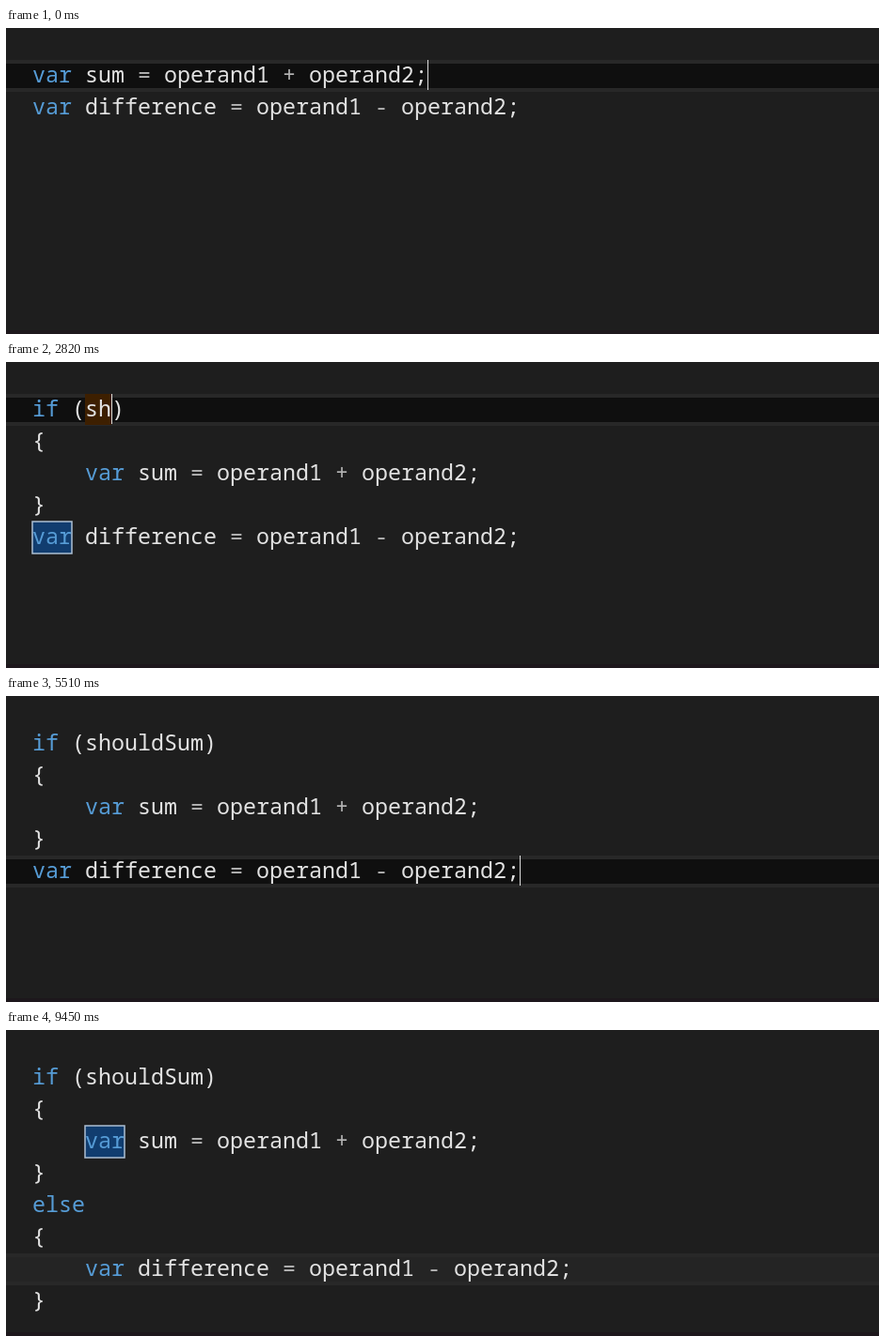
These frames come from a looping animation (928x326 px, 9.48 s). An HTML page with a canvas:

```html
<!DOCTYPE html>
<html lang="en">
<head>
<meta charset="utf-8">
<title>Surround With</title>
<style>
html, body { margin: 0; width: 100%; height: 100%; overflow: hidden; background: #1e1e1e; }
canvas { display: block; }
</style>
</head>
<body>
<canvas id="stage" width="928" height="326"></canvas>
<script>
const ctx = document.getElementById('stage').getContext('2d');
const LOOP = 9480, BLINK = 530, CW = 14, LH = 34, ROW = 27;
const CODE = '500 23.333px "Noto Sans Mono", monospace';
const UI = '500 22.8px "Open Sans", sans-serif';
const SUM = 'var sum = operand1 + operand2;';
const DIFF = 'var difference = operand1 - operand2;';
const SNIPPETS = '#if #region checked class do else enum for foreach forr if interface iterator lock namespace'.split(' ');
const NAMES = 'short shouldSum ushort HashCode HashSet Int16 Stack String Share'.split(' ');

// Key moments of the edit
const IF_ADDED = 2410, TYPE = 2740, COMMIT = 3400, ELSE_ADDED = 7480, BLUR = 9450;
const MOVES = [
  { at: 0, col: 30, row: 0 },
  { at: 600, col: 0, row: 0, select: SUM.length },
  { at: IF_ADDED, col: 4, row: 0, select: 4 },
  { at: TYPE, col: 4, row: 0 },
  { at: 3890, col: 35, row: 2 },
  { at: 4670, col: 1, row: 3 },
  { at: 4810, col: 35, row: 4 },
  { at: 5430, col: 37, row: 4 },
  { at: 5740, col: 0, row: 4, select: DIFF.length },
  { at: ELSE_ADDED, col: 42, row: 6 },
];

const colX = col => 28 + col * CW;
const rowY = row => 34 + row * LH;
const type = (word, start, step, t) => word.slice(0, Math.max(0, Math.floor((t - start) / step) + 1));

function rect(x, y, w, h, color) {
  ctx.fillStyle = color;
  ctx.fillRect(x, y, w, h);
}

function panel(x, y, w, h, fill, edge, line = 1) {
  rect(x, y, w, h, edge);
  rect(x + line, y + line, w - 2 * line, h - 2 * line, fill);
}

function label(text, x, y) {
  ctx.font = UI;
  ctx.fillStyle = '#f6f6f6';
  ctx.fillText(text, x, y);
}

function codeLine(text, row) {
  ctx.font = CODE;
  for (const m of text.matchAll(/\w+|[-+=]|[(){};]/g)) {
    ctx.fillStyle = /^(var|if|else|true)$/.test(m[0]) ? '#569cd6' : /[-+=]/.test(m[0]) ? '#b4b4b4' : '#e2e2e2';
    ctx.fillText(m[0], colX(m.index), rowY(row) + 24);
  }
}

function codeLines(t, condition) {
  if (t < IF_ADDED) return [SUM, DIFF];
  const head = [`if (${condition || 'true'})`, '{', '    ' + SUM, '}'];
  return head.concat(t < ELSE_ADDED ? [DIFF] : ['else', '{', '    ' + DIFF, '}']);
}

// Column and row of each "var" that is highlighted
function marks(t) {
  if (t < 900 || t >= 5350 && t < 6090) return [];
  if (t < IF_ADDED) return [[0, 0], [0, 1]];
  if (t < 5350) return [[0, 4]];
  return t < ELSE_ADDED ? [[4, 2], [0, 4]] : [[4, 2]];
}

function mark([col, row]) {
  const cell = [colX(col), rowY(row), 3 * CW, LH];
  rect(...cell, '#113d6f');
  ctx.strokeStyle = '#adc0d3';
  ctx.lineWidth = 1.5;
  ctx.strokeRect(...cell);
}

function caretShown(t) {
  if (t >= BLUR) return false;
  if (t >= TYPE && t < COMMIT) return true;
  const firstOff = t < IF_ADDED ? 310 : t < ELSE_ADDED ? 3920 : 7940;
  return Math.floor((t - firstOff) / BLINK) % 2 !== 0;
}

function list(x, y, w, items, picked) {
  items.forEach((item, i) => {
    const top = y + i * ROW;
    if (i === picked) rect(x + 1, top, w - 2, ROW, '#3399ff');
    panel(x + 8, top + 6, 16, 15, '#252526', '#c5c5c5', 2);
    label(item, x + 34, top + 21);
  });
}

function picker(y, text, open, choice) {
  panel(28, y, 800, 50, '#1b1b1c', '#333337', 2);
  label('Surround With:', 44, y + 35);
  label(text, 219, y + 35);
  rect(219 + Math.round(ctx.measureText(text).width), y + 8, 1, 32, '#fff');
  if (!open) return;
  const picked = text ? SNIPPETS.indexOf(choice) : 0;
  const start = Math.max(0, picked - 3), top = y + 50;
  panel(219, top, 236, 9 * ROW + 10, '#252526', '#3f3f46');
  list(219, top, 210, SNIPPETS.slice(start, start + 9), picked - start);
  rect(429, top + 1, 25, 9 * ROW + 8, '#3e3e42');
  rect(435, top + 26 + start * 8, 13, 90, '#686868');
}

function completion(full) {
  const x = colX(4), y = rowY(1) + 1;
  panel(x, y, 216, full ? 9 * ROW + 14 : 48, '#252526', '#3f3f46');
  list(x, y + 1, 216, full ? NAMES : ['shouldSum'], full ? 1 : 0);
  const tipY = y + (full ? ROW : 0);
  panel(x + 219, tipY, 351, 32, '#424245', '#4d4d50');
  label('(parameter) bool shouldSum', x + 227, tipY + 24);
}

function draw(t) {
  const condition = type('shouldSum', TYPE, 51, t);
  const { col, row, select } = MOVES.filter(m => m.at <= t).pop();
  rect(0, 0, 928, 326, '#1e1e1e');
  rect(0, 322, 928, 4, '#1d171c');

  if (select) {
    rect(colX(col), rowY(row) - 1, select * CW, LH + 2, '#264f78');
  } else {
    rect(0, rowY(row), 928, LH, '#282828');
    rect(0, rowY(row) + 4, 928, LH - 8, t < BLUR ? '#0f0f0f' : '#242424');
  }
  const editing = t >= TYPE && t < 3890;
  if (editing) rect(colX(4), rowY(0), condition.length * CW, LH - 1, '#3d1f00');
  marks(t).forEach(mark);
  codeLines(t, condition).forEach(codeLine);
  if (caretShown(t)) rect(colX(col + (editing ? condition.length : 0)), rowY(row), 1, 32, '#dcdcdc');

  if (t >= 2860 && t < COMMIT) completion(t < 3000);
  if (t >= 1380 && t < 2390) picker(25, type('if', 1970, 110, t), t >= 1580, 'if');
  if (t >= 6560 && t < 7430) picker(161, type('else', 6900, 120, t), t >= 6660, 'else');
}

const begin = performance.now();
function tick() {
  draw((performance.now() - begin) % LOOP);
  requestAnimationFrame(tick);
}
tick();
</script>
</body>
</html>
```
